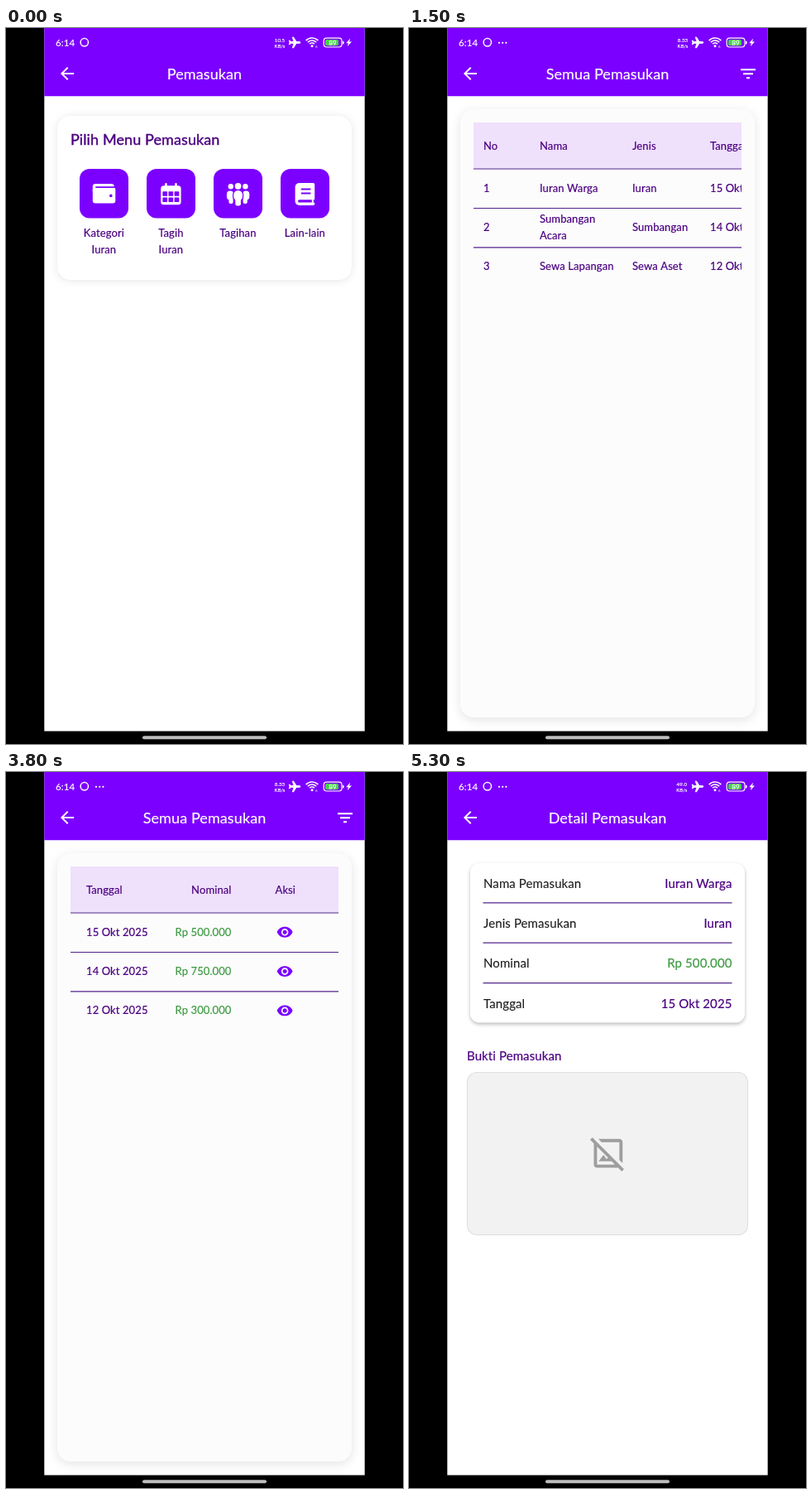
An HTML page with a canvas that plays this animation: 480x864 px, repeating every 5500 ms.

```html
<!DOCTYPE html>
<html lang="id">
<head>
<meta charset="utf-8">
<title>Pemasukan</title>
<style>
html, body { margin: 0; width: 100%; height: 100%; overflow: hidden; background: #000; }
canvas { display: block; }
</style>
</head>
<body>
<canvas id="stage" width="480" height="864"></canvas>
<script>
const LOOP = 5500, W = 480, H = 864;
const VIOLET = '#7c00ff', INDIGO = '#4b0082', GREEN = '#3f9a43', LINE = '#52258a';
const FONT = 'Lato, "Open Sans", sans-serif';
const SCREEN = { x: 46.3, y: 0, w: 387.4, h: 848.4 };
const VIEW = { x: 78, w: 324, max: 267 };

const stage = document.getElementById('stage').getContext('2d');
const layer = document.createElement('canvas');
layer.width = W;
layer.height = H;
const sheet = layer.getContext('2d');
let c = stage;

const ICON = {
  back: new Path2D('M20 11H7.83l5.59-5.59L12 4l-8 8 8 8 1.41-1.41L7.83 13H20v-2z'),
  filter: new Path2D('M10 18h4v-2h-4v2zM3 6v2h18V6H3zm3 7h12v-2H6v2z'),
  plane: new Path2D('M21 16v-2l-8-5V3.5c0-.83-.67-1.5-1.5-1.5S10 2.67 10 3.5V9l-8 5v2l8-2.5V19l-2 1.5V22l3.5-1 3.5 1v-1.5L13 19v-5.5l8 2.5z'),
  eye: new Path2D('M12 4.5C7 4.5 2.73 7.61 1 12c1.73 4.39 6 7.5 11 7.5s9.27-3.11 11-7.5c-1.73-4.39-6-7.5-11-7.5zM12 17c-2.76 0-5-2.24-5-5s2.24-5 5-5 5 2.24 5 5-2.24 5-5 5zm0-8c-1.66 0-3 1.34-3 3s1.34 3 3 3 3-1.34 3-3-1.34-3-3-3z'),
  noImage: new Path2D('M21.9 21.9l-6.1-6.1-2.69-2.69L5 5 3.59 3.59 2.1 2.1.69 3.51 3 5.83V19c0 1.1.9 2 2 2h13.17l2.31 2.31 1.42-1.41zM5 19V7.83l6.84 6.84-.84 1.05L9 13l-3 4h8.17l2 2H5zM7.83 5l-2-2H19c1.1 0 2 .9 2 2v13.17l-2-2V5H7.83z'),
  bolt: new Path2D('M5 0L0 5.6h2.8L1.6 9.6 7 3.8H4z')
};

const clamp = v => Math.max(0, Math.min(1, v));
const span = (t, a, b) => clamp((t - a) / (b - a));
const easeOut = p => 1 - (1 - p) ** 3;

function rect(x, y, w, h, color, r = 0) {
  c.fillStyle = color;
  c.beginPath();
  c.roundRect(x, y, w, h, r);
  c.fill();
}

function dot(x, y, r, color = '#fff') {
  c.fillStyle = color;
  c.beginPath();
  c.arc(x, y, r, 0, Math.PI * 2);
  c.fill();
}

function card(x, y, w, h, r, color, dy, blur, alpha) {
  c.save();
  c.shadowColor = `rgba(0,0,0,${alpha})`;
  c.shadowBlur = blur;
  c.shadowOffsetY = dy;
  rect(x, y, w, h, color, r);
  c.restore();
}

function text(str, x, y, size, color, align = 'left', bold = 0.2) {
  c.font = `${size}px ${FONT}`;
  c.letterSpacing = '0.1px'; // also turns ligatures off
  c.textAlign = align;
  c.fillStyle = c.strokeStyle = color;
  c.lineWidth = bold;
  c.lineJoin = 'round';
  c.fillText(str, x, y);
  if (bold) c.strokeText(str, x, y);
}

function icon(path, x, y, scale, color = '#fff') {
  c.save();
  c.translate(x, y);
  c.scale(scale, scale);
  c.fillStyle = color;
  c.fill(path);
  c.restore();
}

function frame(title) {
  rect(SCREEN.x, 0, SCREEN.w, SCREEN.h, '#fff');
  rect(SCREEN.x, 0, SCREEN.w, 82.3, VIOLET);
  icon(ICON.back, 62, 43, 1);
  text(title, 240, 62, 18, '#fff', 'center');
}

function wallet(x, y) {
  rect(x, y, 26, 12, '#fff', 3.4);
  rect(x, y + 4, 27.5, 19.6, '#fff', 3);
  rect(x + 3.2, y + 3.2, 24.3, 1.7, VIOLET, 0.8);
  dot(x + 22, y + 14.4, 1.8, VIOLET);
}

function calendar(x, y) {
  rect(x, y + 3.2, 24.4, 23, '#fff', 3.5);
  for (const dx of [5, 17]) rect(x + dx, y, 2.5, 6, '#fff', 1.2);
  for (let i = 0; i < 6; i++) {
    rect(x + 2.2 + (i % 3) * 7.1, y + 10.2 + Math.floor(i / 3) * 7.3, 5.7, 5.6, VIOLET, 0.6);
  }
}

function people(x, y) {
  for (const s of [-1, 1]) {
    dot(x + s * 8.8, y + 4.2, 3.2);
    rect(x + s * 9.6 - 4.1, y + 9.4, 8.2, 11, '#fff', 4);
    rect(x + s * 8.6 - 2.6, y + 13, 5.2, 12, '#fff', 2);
  }
  rect(x - 6.6, y + 7.8, 13.2, 15, VIOLET, 6.4);
  rect(x - 4.4, y + 15, 8.8, 14, VIOLET, 3);
  dot(x, y + 3.8, 3.9);
  rect(x - 5.4, y + 9, 10.8, 12.4, '#fff', 5.2);
  rect(x - 3.3, y + 15, 6.6, 12.6, '#fff', 2.4);
}

function book(x, y) {
  rect(x, y, 23.6, 27, '#fff', [5, 1.8, 1.8, 5]);
  rect(x + 7, y + 6.6, 12, 1.9, VIOLET, 0.9);
  rect(x + 7, y + 11.6, 12, 1.9, VIOLET, 0.9);
  rect(x + 3.4, y + 20.2, 16.8, 3.4, VIOLET, [1.7, 0, 0, 1.7]);
  rect(x + 22.2, y + 20, 2, 3.8, VIOLET);
}

function menuPage() {
  frame('Pemasukan');
  card(62, 106, 356, 198, 16, '#fff', 1, 11, 0.1);
  text('Pilih Menu Pemasukan', 78, 141, 18, INDIGO, 'left', 0.4);
  const items = [['Kategori', 'Iuran'], ['Tagih', 'Iuran'], ['Tagihan'], ['Lain-lain']];
  items.forEach((lines, i) => {
    const x = 89 + i * 81;
    rect(x, 170, 59, 59.5, VIOLET, 12);
    lines.forEach((s, j) => text(s, x + 29.4, 252 + j * 19.7, 13, INDIGO, 'center'));
  });
  wallet(104.8, 188);
  calendar(187.2, 187);
  people(280.6, 187);
  book(349.6, 187);
}

function tablePage(t) {
  const scroll = VIEW.max * easeOut(span(t, 1550, 2483));
  frame('Semua Pemasukan');
  icon(ICON.filter, 398, 43.2, 1);
  card(62, 98, 356, 734, 16, '#fcfcfc', 3, 13, 0.11);
  c.save();
  c.beginPath();
  c.rect(VIEW.x, 114, VIEW.w, 702);
  c.clip();
  rect(VIEW.x, 114, VIEW.w, 55.5, '#efe0fc');
  for (let i = 0; i < 3; i++) rect(VIEW.x, 169.5 + i * 47.4, VIEW.w, 1.1, LINE);
  c.translate(-scroll, 0);

  const cell = (s, x, y, color = INDIGO, align) => text(s, x, y, 13, color, align);
  const heads = { No: 90, Nama: 158, Jenis: 270, Tanggal: 364, Aksi: 592.5 };
  for (const s in heads) cell(s, heads[s], 146.6);
  cell('Nominal', 539.5, 146.6, INDIGO, 'right');

  const rows = [
    [['Iuran Warga'], 'Iuran', 15, 500],
    [['Sumbangan', 'Acara'], 'Sumbangan', 14, 750],
    [['Sewa Lapangan'], 'Sewa Aset', 12, 300]
  ];
  rows.forEach(([name, kind, day, sum], i) => {
    const y = 197.8 + i * 47.3;
    cell(i + 1, 90, y);
    name.forEach((s, j) => cell(s, 158, y + (j - (name.length - 1) / 2) * 19.8));
    cell(kind, 270, y);
    cell(day + ' Okt 2025', 364, y);
    cell(`Rp ${sum}.000`, 539.5, y, GREEN, 'right');
    icon(ICON.eye, 593.8, y - 14.8, 0.86, VIOLET);
  });
  c.restore();

  const alpha = span(t, 1550, 1750) * (1 - span(t, 2850, 3200));
  if (alpha > 0) {
    const ratio = VIEW.w / (VIEW.w + VIEW.max);
    rect(VIEW.x + scroll * ratio, 812.8, VIEW.w * ratio, 4.2, `rgba(0,0,0,${0.27 * alpha})`);
  }
}

function detailPage() {
  frame('Detail Pemasukan');
  card(74, 110, 332, 192.5, 11, '#fff', 2, 4, 0.27);
  const rows = [
    ['Nama Pemasukan', 'Iuran Warga'],
    ['Jenis Pemasukan', 'Iuran'],
    ['Nominal', 'Rp 500.000'],
    ['Tanggal', '15 Okt 2025']
  ];
  rows.forEach(([label, value], i) => {
    const y = 139.6 + i * 48.4;
    text(label, 90, y, 15, '#1c1c1c', 'left', 0.1);
    text(value, 390.5, y, 15, i === 2 ? GREEN : INDIGO, 'right');
    if (i < 3) rect(89.5, y + 17.6, 301, 1.2, LINE);
  });
  text('Bukti Pemasukan', 70, 347.6, 15, INDIGO);
  rect(70, 362, 340, 197, '#dedede', 12);
  rect(71, 363, 338, 195, '#f2f2f2', 11);
  icon(ICON.noImage, 217.7, 437, 1.93, '#9e9e9e');
}

function statusBar(t) {
  text('6:14', 60, 22.2, 11.5, '#fff');
  c.strokeStyle = '#fff';
  c.lineWidth = 1.5;
  c.beginPath();
  c.arc(94.8, 17.3, 4.7, 0, Math.PI * 2);
  c.stroke();

  c.globalAlpha = span(t, 50, 500);
  for (let i = 0; i < 3; i++) dot(109 + i * 4.2, 17.8, 1.15);
  c.globalAlpha = 1;

  const rate = t < 700 ? '10.5' : t < 4700 ? '8.33' : '49.0';
  const rx = t < 4700 ? 331 : 329.8;
  text(rate, rx, 17.4, 6.2, '#fff', 'center');
  text('KB/s', rx, 24, 5.8, '#fff', 'center');

  c.save();
  c.translate(349, 17.5);
  c.rotate(Math.PI / 2);
  c.scale(0.68, 0.68);
  c.translate(-11.5, -12);
  c.fillStyle = c.strokeStyle = '#fff';
  c.lineWidth = 1.2;
  c.fill(ICON.plane);
  c.stroke(ICON.plane);
  c.restore();

  c.strokeStyle = '#fff';
  c.lineWidth = 1.7;
  for (const r of [4, 7, 10]) {
    c.beginPath();
    c.arc(370, 22, r, -Math.PI * 0.76, -Math.PI * 0.24);
    c.stroke();
  }
  dot(370, 21.8, 1.5);
  text('6', 375.3, 24, 4.5, '#fff', 'center', 0);

  c.lineWidth = 1.2;
  c.beginPath();
  c.roundRect(384.2, 12.2, 21.8, 10.8, 3.4);
  c.stroke();
  rect(386, 14, 16, 7.2, '#45d04a', 1.6);
  rect(407, 15.8, 1.5, 3.8, '#fff', 0.7);
  text('89', 395, 20.6, 8, '#fff', 'center');
  icon(ICON.bolt, 411.2, 12.8, 0.98);
}

// Zoom-and-fade route change: the old page grows, the new one settles in.
function showPage(draw, t, scale = 1, alpha = 1) {
  c = sheet;
  c.clearRect(0, 0, W, H);
  draw(t);
  c = stage;
  const cx = SCREEN.x + SCREEN.w / 2, cy = SCREEN.h / 2;
  c.save();
  c.beginPath();
  c.rect(SCREEN.x - 0.3, SCREEN.y, SCREEN.w + 0.6, SCREEN.h + 0.6);
  c.clip();
  c.globalAlpha = alpha;
  c.translate(cx, cy);
  c.scale(scale, scale);
  c.translate(-cx, -cy);
  c.drawImage(layer, 0, 0);
  c.restore();
}

const ROUTES = [
  { draw: menuPage, start: -1, end: 0 },
  { draw: tablePage, start: 950, end: 1350 },
  { draw: detailPage, start: 3850, end: 4250 }
];

function render(t) {
  c = stage;
  rect(0, 0, W, H, '#000');
  let i = ROUTES.length - 1;
  while (t < ROUTES[i].start) i--;
  const { draw, start, end } = ROUTES[i];
  const p = span(t, start, end), e = easeOut(p);
  if (p < 1) showPage(ROUTES[i - 1].draw, t, 1 + 0.05 * e);
  showPage(draw, t, 0.85 + 0.15 * e, span(p, 0.1, 0.4));
  statusBar(t);
  rect(165, 854.2, 150, 4, '#bdbdbd', 2);
}

const begin = performance.now();
function tick() {
  render((performance.now() - begin) % LOOP);
  requestAnimationFrame(tick);
}
tick();
</script>
</body>
</html>
```
